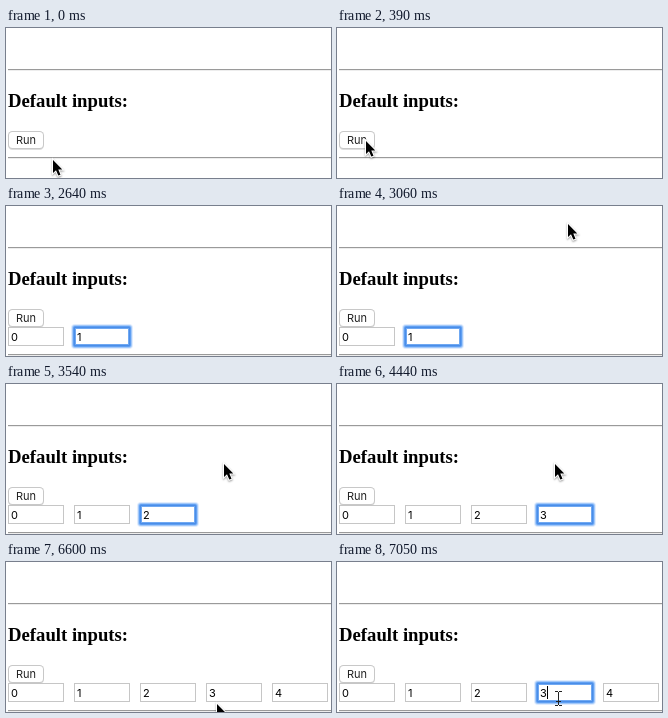
An HTML page with a canvas that plays this animation: 325x150 px, repeating every 7.11 s.

```html
<!DOCTYPE html>
<html lang="en">
<head>
<meta charset="utf-8">
<title>Default inputs</title>
<style>
  html, body { margin: 0; width: 100%; height: 100%; overflow: hidden; background: #fff; }
  canvas { display: block; }
</style>
</head>
<body>
<canvas id="stage" width="325" height="150"></canvas>
<script>
const ctx = document.getElementById('stage').getContext('2d');
const LOOP = 7110, STEP = 30, BLINK = 450;
const FIRST_INPUT = 1290, INPUT_GAP = 900, INPUT_COUNT = 5;
const INPUT = { x: 2, y: 121, w: 56, h: 19, pitch: 66 };
const UI_FONT = '11px Inter, sans-serif';

// Each move eases from one point to another, rests there, or leaves the stage
const moves = [
  { start: 0, end: 300, from: [46, 131], to: [28, 112], lift: 30 },
  { start: 1260, end: 1500, from: [28, 112], to: [40, 152], leaves: true },
  { start: 2790, end: 2850, from: [253, 2], to: [249, 8], leaves: true },
  { start: 3000, end: 3300, from: [231, 10], to: [217, 79] },
  { start: 5700, end: 6240, from: [217, 79], to: [201, 142] },
  { start: 6570, end: 6720, from: [201, 142], to: [285, 131] },
  { start: 6870, end: 7050, from: [285, 131], to: [221, 136], lift: 17 }
];

const clicks = [
  { at: 6210, input: -1 },
  { at: 6690, input: 4 },
  { at: 6990, input: 3 }
];

const lerp = (a, b, u) => a + (b - a) * u;
const smooth = u => u * u * (3 - 2 * u);
const last = list => list[list.length - 1];

function box(x, y, w, h, r, color) {
  ctx.fillStyle = color;
  ctx.beginPath();
  ctx.roundRect(x, y, w, h, r);
  ctx.fill();
}

function text(str, x, y, font, color = '#000') {
  ctx.font = font;
  ctx.fillStyle = color;
  ctx.fillText(str, x, y);
}

function rule(y) {
  box(2, y, 323, 2, 0, '#ededed');
  box(2, y, 323, 1, 0, '#9a9a9a');
}

function drawButton(pressed) {
  box(2, 104, 36, 18, 4.5, '#dedede');
  box(2, 103, 36, 18, 4.5, pressed ? '#3a80e8' : '#c8c8c8');
  box(3, 104, 34, 16, 3.5, pressed ? '#4f97f5' : '#fff');
  text('Run', 10, 116, UI_FONT, pressed ? '#fff' : '#222');
}

function drawInput(i, focused, caretOn) {
  const { y, w, h, pitch } = INPUT, x = INPUT.x + i * pitch;
  const grow = (d, r, color) => box(x - d, y - d, w + 2 * d, h + 2 * d, r, color);
  if (focused) {
    grow(3, 4, '#e0ecfd');
    grow(2, 3, '#a2c8f9');
    grow(1, 2, '#5f9ff2');
    grow(0, 1, '#4a8de8');
    grow(-1, 0, '#6fa8f2');
    grow(-2, 0, '#fff');
  } else {
    grow(0, 0, '#c6c6c6');
    grow(-1, 0, '#fff');
  }
  text(String(i), x + 3, 135, UI_FONT);
  if (caretOn) box(x + 4 + Math.round(ctx.measureText(i).width - 1), 124, 1, 13, 0, '#000');
}

function inputCount(t) {
  const shown = Math.floor((t - FIRST_INPUT) / INPUT_GAP) + 1;
  return Math.max(0, Math.min(INPUT_COUNT, shown));
}

// Each new input takes focus until a click moves it
function focusAt(t) {
  const newest = inputCount(t) - 1;
  return last(clicks.filter(c => c.at <= t)) ||
    { at: FIRST_INPUT + newest * INPUT_GAP, input: newest };
}

function pointerAt(t) {
  const { start, end, from, to, lift = 0, leaves } = last(moves.filter(m => m.start <= t));
  if (leaves && t >= end) return null;
  const u = smooth(Math.min(1, (t - start) / (end - start)));
  return [
    Math.round(lerp(from[0], to[0], u)),
    Math.round(lerp(from[1], to[1], u) - lift * Math.sin(Math.PI * u))
  ];
}

function drawArrow() {
  const shape = new Path2D('M1 1V14L4 11.3L6.3 16.6L8.5 15.7L6.3 10.4H10.3Z');
  ctx.save();
  ctx.shadowColor = 'rgba(0,0,0,.4)';
  ctx.shadowBlur = 2;
  ctx.shadowOffsetY = 1;
  ctx.strokeStyle = '#fff';
  ctx.lineWidth = 2;
  ctx.stroke(shape);
  ctx.restore();
  ctx.fillStyle = '#000';
  ctx.fill(shape);
}

function drawBeam() {
  const bar = (x, y, w, h) => box(x, y, w, h, 0, '#222');
  bar(0, -6, 1, 13);
  bar(-2, 3, 5, 1);
  for (const y of [-7, 7]) {
    bar(-3, y, 3, 1);
    bar(1, y, 3, 1);
  }
}

function drawPointer(t, count) {
  const pos = pointerAt(t);
  if (!pos) return;
  const [x, y] = pos, dx = x - INPUT.x;
  const overInput = y >= INPUT.y && y < INPUT.y + INPUT.h &&
    dx >= 0 && dx < count * INPUT.pitch && dx % INPUT.pitch < INPUT.w;
  ctx.save();
  ctx.translate(x, y);
  overInput ? drawBeam() : drawArrow();
  ctx.restore();
}

function draw(t) {
  const count = inputCount(t), focus = focusAt(t);
  const caretOn = Math.floor((t - focus.at) / BLINK) % 2 === 0;

  box(0, 0, 325, 150, 0, '#fff');
  rule(41);
  text('Default inputs:', 2, 79, 'bold 18.72px "Liberation Serif", serif');
  drawButton(t >= 300 && t < 390);
  rule(count ? 148 : 129);
  for (let i = 0; i < count; i++) {
    const focused = i === focus.input;
    drawInput(i, focused, focused && caretOn);
  }
  drawPointer(t, count);
}

const start = performance.now();
function tick() {
  const t = (performance.now() - start) % LOOP;
  draw(Math.floor(t / STEP) * STEP);
  requestAnimationFrame(tick);
}
tick();
</script>
</body>
</html>
```
